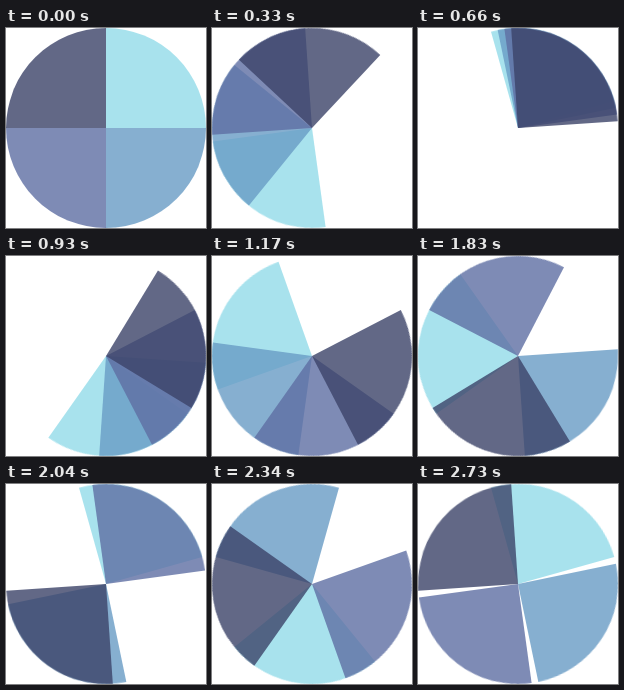
An HTML page that plays this animation: 200x200 px, repeating every 2.76 s.

```html
<!DOCTYPE html>
<html lang="en">
<head>
<meta charset="utf-8">
<title>Wedges spinner</title>
<style>
  html, body {
    margin: 0;
    width: 100%;
    height: 100%;
    overflow: hidden;
    background: #fff;
  }
  svg {
    display: block;
    width: 100%;
    height: 100%;
  }
  .wedge {
    fill-opacity: .8;
    transform-origin: 0 0;
    transform: rotate(var(--start));
    animation: spin 2760ms steps(92, end) infinite;
  }
  /* Each wedge makes a whole number of turns per loop. */
  @keyframes spin {
    from { transform: rotate(var(--start)); }
    to { transform: rotate(calc(var(--start) + var(--turns) * 360deg)); }
  }
  .cyan   { fill: #93dbe9; --start: 0deg;   --turns: 4; }
  .blue   { fill: #689cc5; --start: 90deg;  --turns: 3; }
  .violet { fill: #5e6fa3; --start: 180deg; --turns: 2; }
  .navy   { fill: #3b4368; --start: 270deg; --turns: 1; }
</style>
</head>
<body>
<svg viewBox="-100 -100 200 200">
  <defs>
    <path id="quarter" d="M0 0V-100A100 100 0 0 1 100 0Z"/>
  </defs>
  <g class="wedge cyan"><use href="#quarter"/></g>
  <g class="wedge blue"><use href="#quarter"/></g>
  <g class="wedge violet"><use href="#quarter"/></g>
  <g class="wedge navy"><use href="#quarter"/></g>
</svg>
</body>
</html>
```
